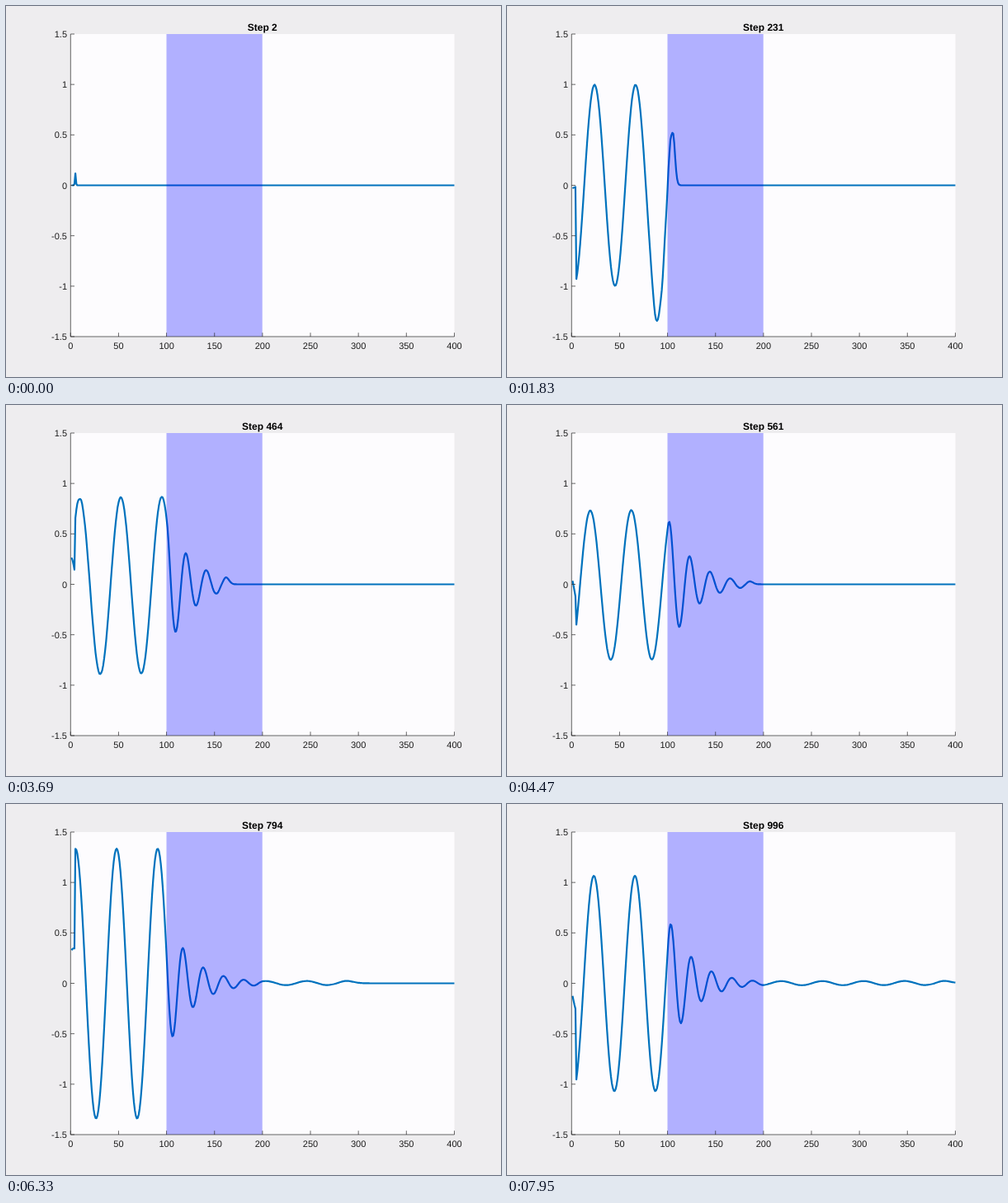
Recreate the animation shown at these times as an HTML page. Size 600 px wide and 450 px high, loop 7.98 s.

```html
<!DOCTYPE html>
<html lang="en">
<head>
<meta charset="utf-8">
<title>Wave entering a lossy slab</title>
<style>
  html, body { margin: 0; width: 100%; height: 100%; overflow: hidden; background: #eeedef; }
  svg { display: block; width: 600px; height: 450px; }
  text { font: 11px "Liberation Sans", Arial, sans-serif; fill: #1c1c1c; text-rendering: geometricPrecision; }
  #title { font-size: 12px; font-weight: bold; fill: #000; text-anchor: middle; }
  .x { text-anchor: middle; }
  .y { text-anchor: end; }
  #axes { fill: none; stroke: #262626; stroke-width: .7; }
  #wave { fill: none; stroke: #0072bd; stroke-width: 2.2; stroke-linejoin: round; }
</style>
</head>
<body>
<svg viewBox="0 0 600 450">
  <rect x="78.3" y="34" width="465.2" height="367" fill="#fdfcfe"/>
  <polyline id="wave"/>
  <rect x="194.5" y="34" width="116.2" height="367" fill="#00f" fill-opacity=".3"/>
  <path id="axes"/>
  <g id="labels"></g>
  <text id="title" x="310.8" y="29.5"></text>
</svg>
<script>
const CELLS = 400, FRAME = 30, FRAMES = 266;
const $ = id => document.getElementById(id);
const px = x => 78.3 + x * 1.1629;
const py = y => 217.5 - y * 122.33;
const stepAt = frame => 2 + Math.ceil(3.75 * frame);

// 1D FDTD, Courant number 0.5, with a one-way 700 MHz source at cell 5
function simulate(steps) {
  const c = 2.99792458e8, dx = 0.01, dt = dx / (2 * c), eps0 = 8.854e-12;
  const omega = 2 * Math.PI * 700e6 * dt;
  const pulse = t => Math.sin(omega * Math.max(t, 0));
  const e = new Float64Array(CELLS + 1), h = new Float64Array(CELLS + 1);
  const loss = dt * 0.04 / (2 * eps0 * 4);
  const left = [0, 0], right = [0, 0];
  const history = [e.slice()];
  for (let t = 1; t <= steps; t++) {
    for (let k = 2; k < CELLS; k++) {
      const curl = 0.5 * (h[k - 1] - h[k]);
      const slab = k > 100 && k <= 200;
      e[k] = slab ? (e[k] * (1 - loss) + curl / 4) / (1 + loss) : e[k] + curl;
    }
    e[5] += 0.5 * pulse(t + 0.5);
    // absorbing ends: the neighbour's value two steps ago
    e[1] = left.shift();
    left.push(e[2]);
    e[CELLS] = right.shift();
    right.push(e[CELLS - 1]);
    for (let k = 1; k < CELLS; k++) h[k] += 0.5 * (e[k] - e[k + 1]);
    h[4] += 0.5 * pulse(t - 1);
    history.push(e.slice());
  }
  return history;
}

function drawAxes() {
  let path = `M${px(0)} 34V401H${px(400)}`;
  let labels = "";
  for (let x = 0; x <= 400; x += 50) {
    path += `M${px(x)} 401v-4.7`;
    labels += `<text class="x" x="${px(x)}" y="416">${x}</text>`;
  }
  for (let y = -1.5; y <= 1.5; y += 0.5) {
    path += `M${px(0)} ${py(y)}h4.7`;
    labels += `<text class="y" x="74" y="${py(y) + 4}">${y}</text>`;
  }
  $("axes").setAttribute("d", path);
  $("labels").innerHTML = labels;
}

const field = simulate(stepAt(FRAMES - 1));
let shown = -1;

function draw(now) {
  const frame = Math.floor(now / FRAME) % FRAMES;
  if (frame !== shown) {
    shown = frame;
    const step = stepAt(frame);
    const points = Array.from(field[step], (v, k) => px(k).toFixed(2) + "," + py(v).toFixed(2));
    $("wave").setAttribute("points", points.slice(1).join(" "));
    $("title").textContent = "Step " + step;
  }
}

let start;
function tick(now) {
  start ??= now;
  draw(now - start);
  requestAnimationFrame(tick);
}

drawAxes();
draw(0);
requestAnimationFrame(tick);
</script>
</body>
</html>
```
